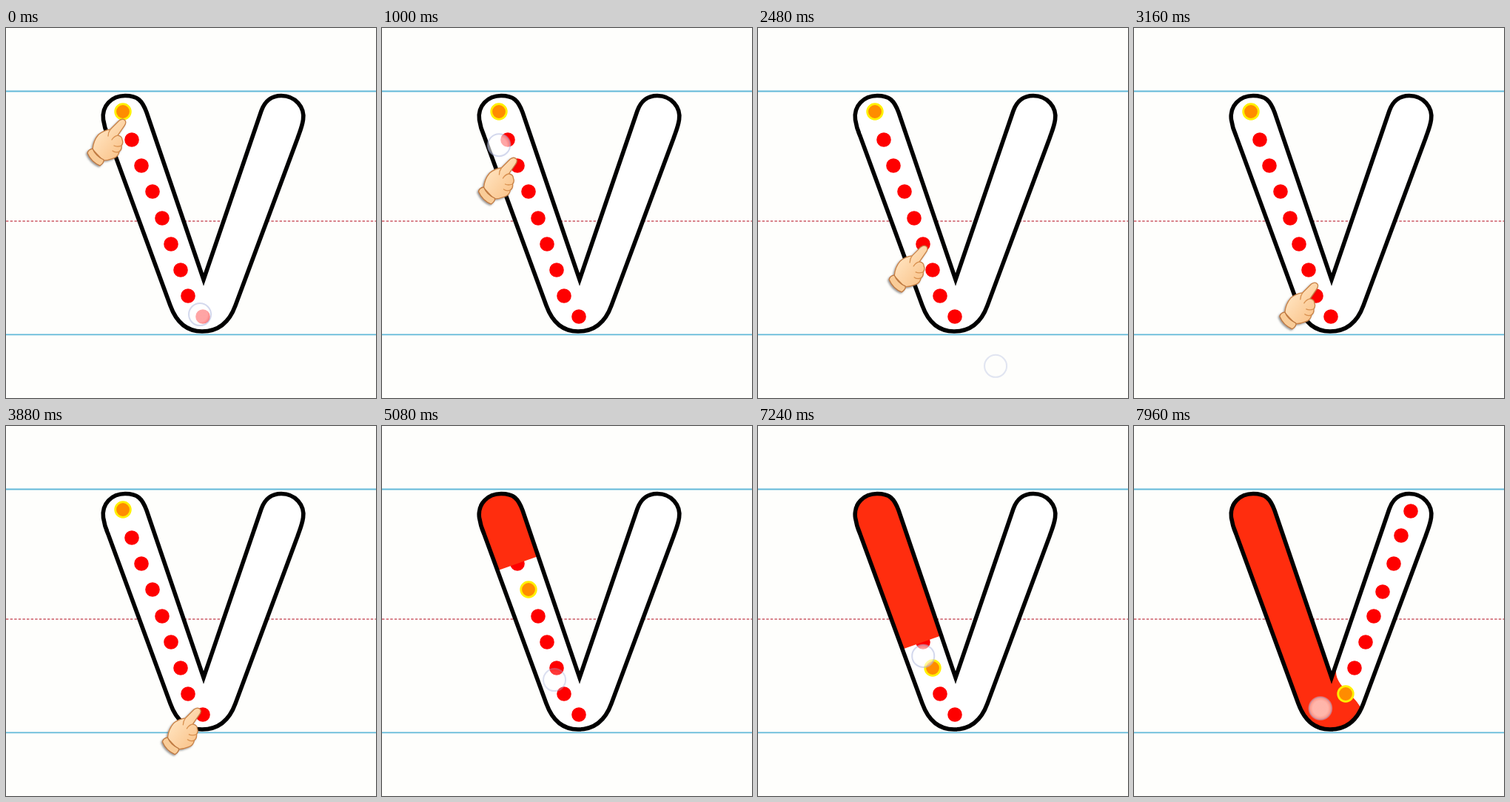
Animation, 500 px wide and 500 px high, one loop 8000 ms. Source, as an HTML page:

```html
<!DOCTYPE html>
<html lang="en">
<head>
<meta charset="utf-8">
<title>Trace the letter V</title>
<style>
  html, body { margin: 0; width: 100%; height: 100%; overflow: hidden; background: #fefefc; }
  svg { display: block; width: 100%; height: 100%; }
</style>
</head>
<body>
<svg viewBox="0 0 500 500">
  <defs>
    <path id="letter" d="M131.5 124C129 105 143 91.5 161 91.5C178 91.5 184 98 190 114L267 340L345 112
      C350 98 360 91.5 372 91.5C391 91.5 404 107 401.5 124C400 134 397 140 394 149L310 375
      C302 397 287 410 265 410C243 410 230 397 222 375L138 146C134 137 132.5 131 131.5 124Z"/>
    <clipPath id="inside"><use href="#letter"/></clipPath>
    <linearGradient id="skin" x1="0" y1="0" x2="1" y2="1">
      <stop offset=".3" stop-color="#ffdfb8"/>
      <stop offset="1" stop-color="#f8bd80"/>
    </linearGradient>
    <radialGradient id="glow">
      <stop offset=".6" stop-color="#fff" stop-opacity=".65"/>
      <stop offset=".85" stop-color="#fff" stop-opacity=".5"/>
      <stop offset="1" stop-color="#eef" stop-opacity="0"/>
    </radialGradient>
    <filter id="shadow" x="-30%" y="-30%" width="160%" height="160%">
      <feDropShadow dx="-1.5" dy="1.5" stdDeviation="1.2" flood-color="#555" flood-opacity=".6"/>
    </filter>
  </defs>

  <rect width="500" height="500" fill="#fefefc"/>
  <path d="M0 85.5H500M0 414.3H500" stroke="#62b9d9" stroke-width="1.8"/>
  <path d="M0 261H500" stroke="#cb5966" stroke-width="1.5" stroke-dasharray="3.4 2.2"/>

  <use href="#letter" fill="#fff"/>
  <g id="dots" fill="#fe0000"></g>
  <g clip-path="url(#inside)"><path id="fill" fill="#ff2d0e"/></g>
  <use href="#letter" fill="none" stroke="#000" stroke-width="5.6" stroke-miterlimit="10"/>
  <circle id="current" r="10.3" fill="#ff8c00" stroke="#fff000" stroke-width="2.8"/>

  <g id="hand" filter="url(#shadow)" stroke-linejoin="round" stroke-linecap="round">
    <path d="M117 164Q118 152 125 144Q132 138 141 137L153 125Q158 121.500 161 125Q163 128 160 132L151 145
      Q157 146 157 151Q159 155 156 159Q157 164 153 167Q152 174 145 176Q138 179 131 179Z"
      fill="url(#skin)" stroke="#c98246" stroke-width="1.3"/>
    <path d="M151 145Q146 146 143 151M156 159Q150 161 146 159M153 167Q148 169 144 166M141 137Q138 141 138 146"
      fill="none" stroke="#d8904f" stroke-width="1.3"/>
    <path d="M117 163Q121 173 132 178Q133 182 127 186Q115 181 110 169Q111 164 117 163Z"
      fill="#f9cc98" stroke="#bd7840" stroke-width="1.3"/>
  </g>

  <g id="touch">
    <circle r="17" fill="url(#glow)"/>
  </g>
  <circle id="ring" r="15" fill="none" stroke="#8f9cd0" stroke-opacity=".38" stroke-width="2"/>
</svg>

<script>
const LOOP = 8000;
const $ = id => document.getElementById(id);

const down = [[158, 113], [170, 151], [183, 186], [198, 221], [211, 257],
              [223, 292], [236, 327], [246, 362], [266, 390]];
const up = [[286, 362], [298, 327], [313, 292], [324, 257],
            [336, 224], [351, 186], [361, 148], [374, 115]];

// Times at which each dot of the first stroke is passed
const passed = [4320, 4440, 4560, 6680, 6900, 7120, 7340, 7560, 7700];

// Finger sweeps: [time, x, y, opacity of the touch glow]
const sweeps = [
  [[0, 262, 387, 1], [160, 268, 398, 0]],
  [[720, 147, 118, .9], [1000, 158, 158, 1], [2150, 268, 385, .8], [2480, 321, 457, .2], [2570, 328, 443, 0]],
  [[4260, 155, 113, 1], [4700, 192, 225, 1], [5080, 233, 343, .35], [5960, 285, 434, 0]],
  [[6380, 176, 180, .8], [6560, 182, 201, .9], [7700, 251, 385, 1], [8000, 252, 381, 1]]
];

const finish = "M0 0H273V333C274 352 296 362 306 380V420H0Z";

function move(el, x, y) {
  el.setAttribute("transform", `translate(${x.toFixed(2)} ${y.toFixed(2)})`);
}

function show(el, on) {
  el.style.display = on ? "" : "none";
}

function dotGroup(points) {
  const g = document.createElementNS("http://www.w3.org/2000/svg", "g");
  for (const [x, y] of points) {
    const c = document.createElementNS(g.namespaceURI, "circle");
    c.setAttribute("r", 9.8);
    move(c, x, y);
    g.append(c);
  }
  return $("dots").appendChild(g);
}

const downDots = dotGroup(down), upDots = dotGroup(up);

// Everything above a line across the left arm
function cut([x, y]) {
  return `M${x - 40} ${y + 14}L${x + 28} ${y - 10}L${x - 109} ${y - 410}H-200Z`;
}

function touchAt(t) {
  const keys = sweeps.find(s => t >= s[0][0] && t < s[s.length - 1][0]);
  if (!keys) return null;
  const i = keys.findIndex(k => k[0] > t), a = keys[i - 1], b = keys[i];
  const p = (t - a[0]) / (b[0] - a[0]);
  return a.map((v, j) => v + (b[j] - v) * p);
}

function draw(t) {
  const n = passed.filter(p => t >= p).length;
  const done = n === down.length;

  show(downDots, !done);
  show(upDots, done);
  $("fill").setAttribute("d", done ? finish : n ? cut(down[n - 1]) : "");
  move($("current"), ...(done ? up[0] : down[n]));

  const p = Math.min(t / 4000, 1);
  const e = (p + (1 - Math.cos(Math.PI * p)) / 2) / 2;
  move($("hand"), 103 * e, 262 * e);
  show($("hand"), t < 4240);

  const touch = touchAt(t);
  show($("touch"), touch);
  show($("ring"), touch);
  if (touch) {
    const [, x, y, glow] = touch;
    move($("touch"), x, y);
    move($("ring"), x, y);
    $("touch").setAttribute("opacity", glow.toFixed(3));
    $("ring").setAttribute("opacity", Math.min(1, .5 + glow).toFixed(3));
  }
}

const start = performance.now();
function tick() {
  draw((performance.now() - start) % LOOP);
  requestAnimationFrame(tick);
}
tick();
</script>
</body>
</html>
```
